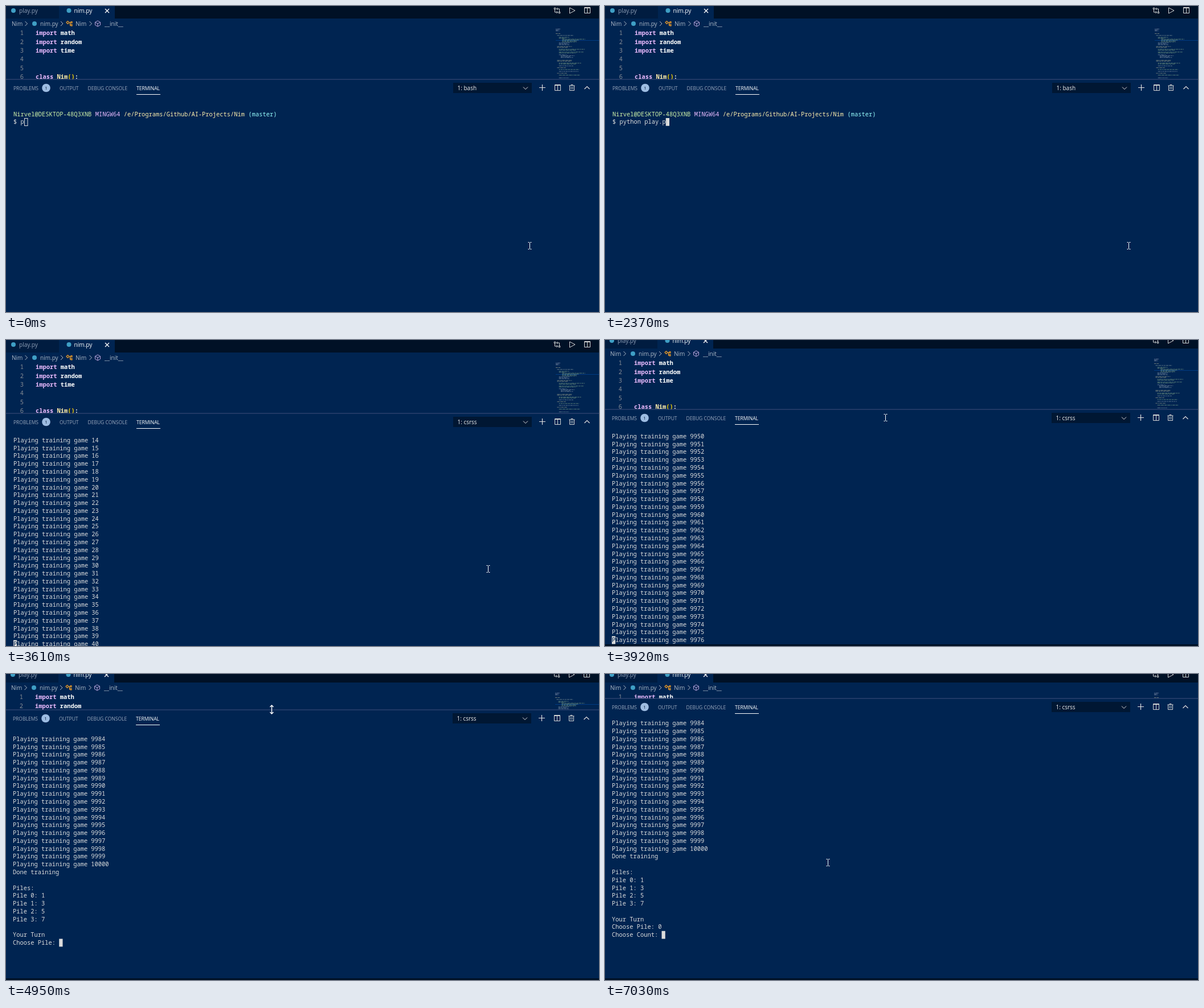
An HTML page with a canvas for the animation above (8000 ms loop, 1041x538 px).

```html
<!DOCTYPE html>
<html lang="en">
<head>
<meta charset="utf-8">
<title>Nim training in a terminal</title>
<style>
html, body { margin: 0; width: 100%; height: 100%; overflow: hidden; background: #002451; }
canvas { display: block; }
</style>
</head>
<body>
<canvas id="stage" width="1041" height="538"></canvas>
<script>
const ctx = document.getElementById('stage').getContext('2d');
const LOOP = 8000, W = 1041, H = 538;
const BG = '#002451', DARK = '#001126', LIGHT = '#dcdcdc', DIM = '#9aa8bd', ICON = '#d4d4d4';
const PINK = '#ebbbff', CREAM = '#ffeead', GREEN = '#d1f1a9', CYAN = '#99ffff';
const MONO_FACE = '10.42px "Noto Sans Mono", "DejaVu Sans Mono", monospace';
const MONO = '500 ' + MONO_FACE;
const CODE = '600 ' + MONO_FACE;
const ui = size => `${size}px "Open Sans", "Noto Sans", sans-serif`;

// Terminal grid
const CELL = 6.25, ROW = 13.78, LEFT = 13, BOTTOM = 541.5, ROWS = 27;
const GAMES = 10000, FIRST_GAME_ROW = 3;
const ENDING = ['Done training', '', 'Piles:', 'Pile 0: 1', 'Pile 1: 3', 'Pile 2: 5', 'Pile 3: 7', '', 'Your Turn'];
const PROMPT = [
  ['Nirvel@DESKTOP-48Q3XNB ', GREEN], ['MINGW64 ', PINK],
  ['/e/Programs/Github/AI-Projects/Nim ', CREAM], ['(master)', CYAN]
];

// Held states: time, games played, panel top, view shifted, pointer x, y, pointer shape
const STATES = [
  [0, 0, 129, false, 919, 421, 'beam'],
  [580, 0, 129, false, 923, 423, 'beam'],
  [670, 0, 129, false, 919, 421, 'beam'],
  [3370, 1, 129, false, 919, 421, 'beam'],
  [3460, 14, 129, false, 915, 420, 'beam'],
  [3530, 27, 129, false, 890, 414, 'beam'],
  [3610, 40, 129, false, 846, 402, 'beam'],
  [3690, 53, 129, false, 770, 362, 'beam'],
  [3760, 9952, 129, true, 650, 280, 'beam'],
  [3840, 9964, 129, true, 550, 190, 'beam'],
  [3910, 9976, 129, true, 492, 136, 'beam'],
  [3990, 9988, 129, true, 478, 121, 'resize'],
  [4070, 9992, 129, true, 478, 121, 'resize'],
  [4140, 9996, 129, true, 478, 121, 'resize'],
  [4220, GAMES, 129, true, 478, 121, 'resize'],
  [4870, GAMES, 108, true, 474, 100, 'resize'],
  [4950, GAMES, 70, true, 466, 62, 'resize'],
  [5030, GAMES, 50, true, 455, 21, 'resize'],
  [5100, GAMES, 50, true, 415, 210, 'beam'],
  [5180, GAMES, 50, true, 391, 331, 'beam']
];

function stateAt(time) {
  const [, games, top, shifted, x, y, shape] = STATES.findLast(s => s[0] <= time);
  return { time, games, top, shifted, x, y, shape };
}

function rect(x, y, w, h, color) {
  ctx.fillStyle = color;
  ctx.fillRect(x, y, w, h);
}

function text(str, x, y, color, font, align = 'left') {
  ctx.font = font;
  ctx.textAlign = align;
  ctx.fillStyle = color;
  ctx.fillText(str, x, y);
}

function runs(parts, x, y, font) {
  for (const [str, color] of parts) {
    text(str, x, y, color, font);
    x += str.length * CELL;
  }
}

function dot(x, y, r, color) {
  ctx.fillStyle = color;
  ctx.beginPath();
  ctx.arc(x, y, r, 0, 7);
  ctx.fill();
}

function icon(x, y, path, color = ICON, width = 1) {
  ctx.save();
  ctx.translate(x, y);
  ctx.strokeStyle = color;
  ctx.lineWidth = width;
  ctx.stroke(new Path2D(path));
  ctx.restore();
}

const SHAPES = {
  right: 'M-2-4L2 0L-2 4',
  up: 'M-4.5 2.5L0-2L4.5 2.5',
  down: 'M-4-2L0 2L4-2',
  close: 'M-3.5-3.5L3.5 3.5M3.5-3.5L-3.5 3.5',
  plus: 'M-5.5 0H5.5M0-5.5V5.5',
  split: 'M-5-5H5V5H-5ZM0-5V5M-5-4H5',
  run: 'M-4.5-5L5 0L-4.5 5Z',
  compare: 'M-4-2V3H1M-1 1L1 3L-1 5M4 2V-3H-1M1-5L-1-3L1-1M-5.2-4.8h2.4v2.4h-2.4zM2.8 2.4h2.4v2.4h-2.4z',
  trash: 'M-5-3.5H5M-1.5-3.5V-5H1.5V-3.5M-4-3.5V5H4V-3.5M-1.4-1.5V3M1.4-1.5V3',
  class: 'M-5-2L-2.5-4.5L0-2L-2.5 .5ZM0-2H3M1.5-2V3H3M3-3.5h2v2.5h-2zM3 1.5h2v2.5h-2z',
  cube: 'M0-5L4.5-2.5V2.5L0 5L-4.5 2.5V-2.5ZM-4.5-2.5L0 0L4.5-2.5M0 0V5',
  beam: 'M-3-6H-1L0-5L1-6H3M0-5V5M-3 6H-1L0 5L1 6H3',
  resize: 'M0-7V7M-3-4.5L0-7.5L3-4.5M-3 4.5L0 7.5L3 4.5'
};

function drawTabs() {
  rect(0, -10, W + 10, 32, DARK);
  rect(0, -10, 93, 32, '#001c40');
  rect(93, -10, 98, 32, BG);
  dot(13, 8, 4, '#3f9fc5');
  text('play.py', 23, 12, '#8f9fb6', ui(10.1));
  dot(110.5, 8, 4, '#3f9fc5');
  text('nim.py', 119.5, 12, '#ffffff', ui(10.1));
  icon(177.5, 8.5, SHAPES.close, '#ffffff', 1.3);
  icon(967.5, 8, SHAPES.compare);
  icon(994, 8, SHAPES.run);
  icon(1020.5, 7.5, SHAPES.split);
}

function drawBreadcrumbs() {
  const color = '#b0bac7', font = ui(10);
  text('Nim', 10, 34.7, color, font);
  text('nim.py', 60, 34.7, color, font);
  text('Nim', 122, 34.7, color, font);
  text('__init__', 173, 34.7, color, font);
  for (const x of [35.5, 98, 148.5]) icon(x, 31, SHAPES.right, color);
  dot(50, 31, 4, '#3f9fc5');
  icon(111, 31, SHAPES.class, '#ee9d28', 1.2);
  icon(161, 31, SHAPES.cube, '#b9a3dc');
}

const SOURCE = [
  [['import ', PINK], ['math', '#ffffff']],
  [['import ', PINK], ['random', '#ffffff']],
  [['import ', PINK], ['time', '#ffffff']],
  [], [],
  [['class ', PINK], ['Nim', CREAM], ['()', '#ffd700'], [':', '#ffffff']]
];

function drawCode() {
  SOURCE.forEach((parts, i) => {
    const y = 51.2 + i * 15.4;
    text(i + 1, 31, y, '#858c94', MONO, 'right');
    runs(parts, 52, y, CODE);
  });
}

// Blocks of tiny lines: first row, rows, indent, longest line, color
const BLOCKS = [
  [0, 3, 0, 11, '#e8e0f0'], [5, 1, 0, 10, CREAM], [7, 1, 3, 36, '#dfe6d0'],
  [9, 2, 7, 22, GREEN], [11, 4, 14, 50, GREEN], [15, 3, 7, 24, '#e0e0e0'],
  [19, 2, 3, 32, CREAM], [22, 2, 7, 56, GREEN], [25, 2, 7, 54, GREEN],
  [28, 1, 7, 18, '#e0e0e0'], [29, 3, 11, 30, '#e0e0e0'], [34, 2, 3, 32, CREAM],
  [37, 2, 7, 48, GREEN], [40, 1, 7, 31, '#e0e0e0'], [42, 1, 3, 20, CREAM],
  [44, 1, 7, 44, GREEN], [46, 1, 7, 42, '#e0e0e0'], [48, 1, 3, 22, CREAM],
  [50, 1, 7, 46, GREEN], [53, 1, 7, 22, '#e0e0e0']
];

function drawMinimap() {
  let seed = 7;
  const random = () => (seed = seed * 16807 % 2147483647) / 2147483647;
  rect(965, 60, 90, 1, '#003b82');
  ctx.globalAlpha = 0.45;
  for (const [first, count, indent, longest, color] of BLOCKS) {
    for (let r = 0; r < count; r++) {
      const end = longest * (r ? 0.6 + 0.4 * random() : 1) * 0.81;
      let x = 0;
      while (x < end) {
        const word = Math.min(1.5 + random() * 4, end - x);
        rect(965 + indent * 0.81 + x, 40 + (first + r) * 1.62, word, 0.9, color);
        x += word + 1;
      }
    }
  }
  ctx.globalAlpha = 1;
}

function drawPanelHeader({ top, time }) {
  const y = top + 15, base = y + 3.5, font = ui(8.5);
  rect(0, top, W + 10, H, BG);
  rect(0, top - 0.5, W + 10, 1, '#404f7d');
  text('PROBLEMS', 13, base, DIM, font);
  dot(70.5, y, 7.3, '#9dbce2');
  text('1', 70.5, base - 0.3, '#001733', ui(8), 'center');
  text('OUTPUT', 94, base, DIM, font);
  text('DEBUG CONSOLE', 143.5, base, DIM, font);
  text('TERMINAL', 229, base, '#ffffff', '500 ' + font);
  rect(229, y + 11, 42, 1, '#ffffff');
  rect(785, y - 9, 138, 18, '#001733');
  text(time < 3220 ? '1: bash' : '1: csrss', 792.5, y + 4.3, '#f0f0f0', ui(10));
  icon(912, y + 0.5, SHAPES.down, '#e0e0e0');
  icon(941.5, y - 0.5, SHAPES.plus, '#e0e0e0', 1.2);
  icon(968.5, y - 0.5, SHAPES.split);
  icon(993.5, y - 0.5, SHAPES.trash);
  icon(1020, y - 0.5, SHAPES.up, '#e0e0e0', 1.2);
}

function commandAt(time) {
  if (time < 1210) return '$ p';
  return time >= 2370 && time < 2910 ? '$ python play.p' : '$ python play.py';
}

function terminalAt({ time, games }) {
  const done = games === GAMES;
  const ending = [...ENDING, time < 6480 ? 'Choose Pile: ' : 'Choose Pile: 0'];
  const settled = FIRST_GAME_ROW + games + (done ? ending.length : 0);
  if (time >= 7030) ending.push('Choose Count: ');
  const command = commandAt(time);

  const line = row => {
    if (row === 2) return command;
    const game = row - FIRST_GAME_ROW + 1;
    if (game < 1) return '';
    if (game <= games) return 'Playing training game ' + game;
    return done ? ending[game - games - 1] || '' : '';
  };

  let row = 2, col = command.length;
  if (done) {
    row = FIRST_GAME_ROW + games + ending.length - 1;
    col = ending.at(-1).length;
  } else if (time >= 3060) {
    row = games > 1 ? settled - 1 : FIRST_GAME_ROW + games;
    col = 0;
  }
  return { line, row, col, start: Math.max(0, settled - ROWS) };
}

function drawTerminal(state) {
  const { line, row, col, start } = terminalAt(state);
  const visible = Math.floor((505.5 - state.top) / ROW);
  const top = BOTTOM - visible * ROW;
  for (let i = 0; i < visible; i++) {
    const base = top + i * ROW + 10.4;
    if (start + i === 1) runs(PROMPT, LEFT, base, MONO);
    else text(line(start + i), LEFT, base, LIGHT, MONO);
  }
  const x = LEFT + col * CELL, y = top + (row - start) * ROW;
  if (state.time < 580) {
    ctx.strokeStyle = LIGHT;
    ctx.lineWidth = 1;
    ctx.strokeRect(Math.round(x) + 0.5, Math.round(y) + 0.5, 5.5, 13);
  } else {
    rect(x, y, CELL, ROW, LIGHT);
    text(line(row)[col] || '', x, y + 10.4, BG, MONO);
  }
}

function draw(time) {
  const state = stateAt(time);
  rect(0, 0, W, H, BG);
  ctx.save();
  if (state.shifted) ctx.translate(-1, -7);
  drawTabs();
  drawBreadcrumbs();
  drawCode();
  drawMinimap();
  drawPanelHeader(state);
  drawTerminal(state);
  rect(0, 542, W + 10, 20, DARK);
  ctx.restore();
  icon(state.x + 0.5, state.y + 0.5, SHAPES[state.shape], '#ffffff', state.shape === 'beam' ? 1 : 1.4);
}

function tick() {
  draw(performance.now() % LOOP);
  requestAnimationFrame(tick);
}
tick();
</script>
</body>
</html>
```
